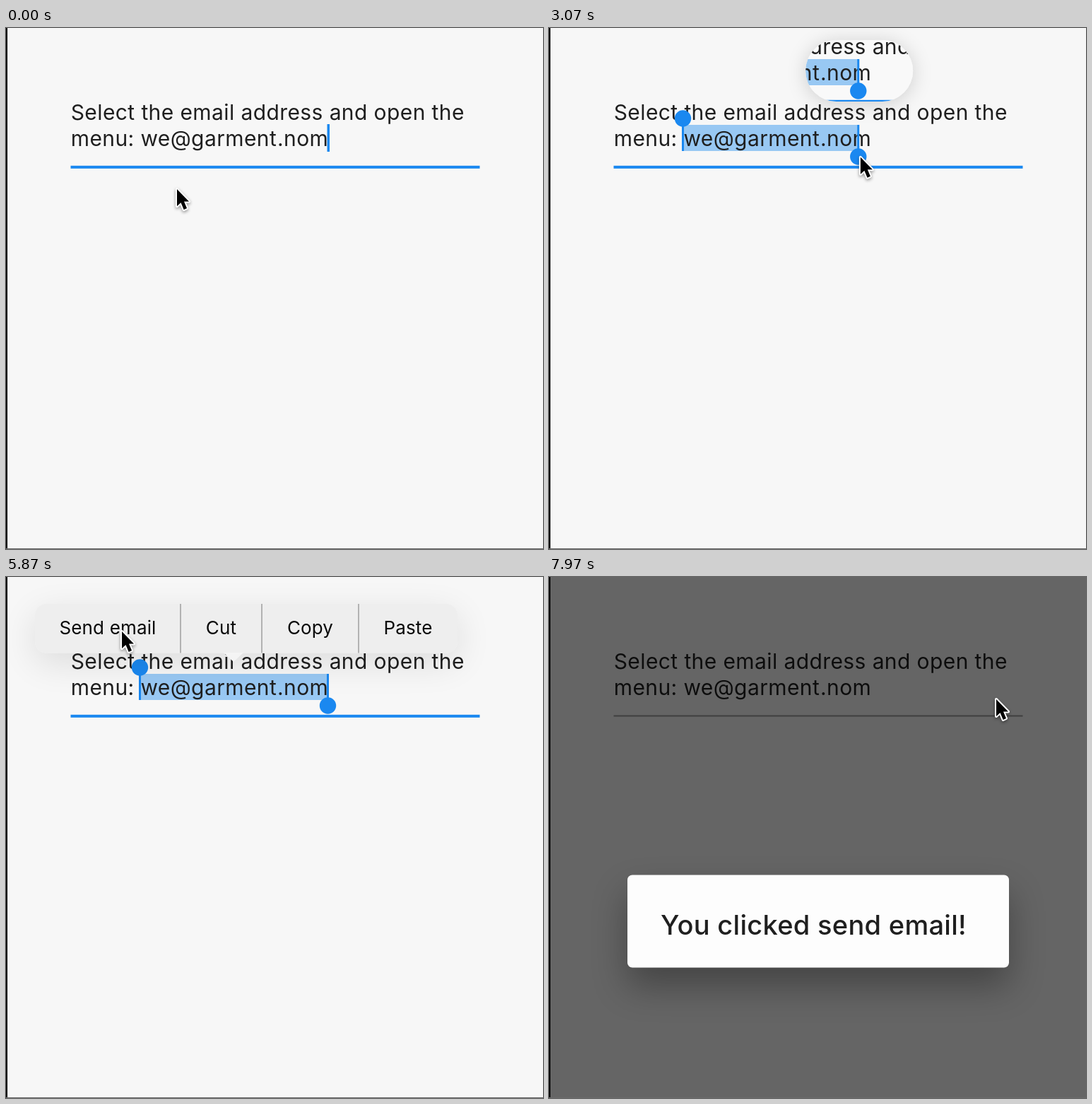
An HTML page with a canvas for the animation above (8 s loop, 760x737 px).

```html
<!DOCTYPE html>
<html lang="en">
<head>
<meta charset="utf-8">
<title>Send email menu</title>
<style>
  html, body { margin: 0; width: 100%; height: 100%; overflow: hidden; background: #f7f7f7; }
  canvas { display: block; }
</style>
</head>
<body>
<canvas id="stage" width="760" height="737"></canvas>
<script>
const ctx = document.getElementById('stage').getContext('2d');
const W = 760, H = 737, LOOP = 8000;
const BLUE = '#1a88f0', INK = '#1f1f1f';
const SEL_LEFT = 189.5, SEL_RIGHT = 384, CHAR = 17.75;
const SELECT = 1150, DRAG = 2550, RELEASE = 3950, CLICK = 5960, DIALOG = 6222;

// Pointer moves: start, end, and where the tip comes to rest
const START = [240, 226];
const MOVES = [
  [30, 750, 300, 158],
  [1450, 2150, 386, 180],
  [DRAG, 3300, 454, 181],
  [RELEASE, 4400, 444, 204],
  [4400, 5020, 200, 88],
  [5020, 5450, 162, 75],
  [6970, 7470, 640, 117],
  [7700, 7970, 631, 171]
];

const ramp = (t, from, ms = 150) => Math.max(0, Math.min(1, (t - from) / ms));
const smooth = u => u * u * (3 - 2 * u);
const fade = (t, from, to) => ramp(t, from) - ramp(t, to);

function pointerAt(t) {
  return MOVES.reduce(([x, y], [from, to, nx, ny]) => {
    const u = smooth(ramp(t, from, to - from));
    return [x + (nx - x) * u, y + (ny - y) * u];
  }, START);
}

const dragX = t => SEL_RIGHT + 4 * CHAR * smooth(ramp(t, DRAG, 750));
const selectionEnd = t => SEL_RIGHT + CHAR * Math.round((dragX(t) - SEL_RIGHT) / CHAR);

function rect(color, x, y, w, h) {
  ctx.fillStyle = color;
  ctx.fillRect(x, y, w, h);
}

function text(str, x, y, size, color, spacing, weight = 400) {
  ctx.font = `${weight} ${size}px Inter, sans-serif`;
  ctx.letterSpacing = spacing + 'px';
  ctx.fillStyle = color;
  ctx.fillText(str, x, y);
}

// Rounded panel whose shadow is kept outside its own shape
function panel(x, y, w, h, r, color, shade, blur, dy) {
  const shape = new Path2D(), outside = new Path2D();
  shape.roundRect(x, y, w, h, r);
  outside.rect(0, 0, W, H);
  outside.addPath(shape);
  ctx.save();
  ctx.clip(outside, 'evenodd');
  ctx.globalAlpha *= shade;
  ctx.shadowColor = ctx.fillStyle = '#000';
  ctx.shadowBlur = blur;
  ctx.shadowOffsetX = 2 * W;
  ctx.shadowOffsetY = dy;
  ctx.translate(-2 * W, 0);
  ctx.fill(shape);
  ctx.restore();
  ctx.fillStyle = color;
  ctx.fill(shape);
  return shape;
}

function handle(x, y) {
  rect(BLUE, x - 1.5, 137, 3, 37);
  ctx.beginPath();
  ctx.arc(x, y, 11.7, 0, 7);
  ctx.fill();
}

function field(t) {
  const selected = t >= SELECT && t < CLICK, end = selectionEnd(t);
  if (selected) rect('#98c8f3', SEL_LEFT, 137, end - SEL_LEFT, 37);
  text('Select the email address and open the', 91.7, 129.8, 30, INK, .4);
  text('menu: we@garment', 91.7, 166.8, 30, INK, .4);
  text('.nom', 384, 166.8, 30, INK, .4);
  if (t < 6300) rect(BLUE, 91.5, 194.8, 579, 4);
  else rect('rgba(0,0,0,.38)', 91.5, 195.5, 579, 2);
  if (selected) {
    handle(SEL_LEFT, 128);
    handle(end + .5, 182);
  } else if (t < SELECT && t % 900 < 400) {
    rect(BLUE, 454.5, 136, 3.5, 39);
  }
}

function magnifier(t) {
  const a = fade(t, 2300, RELEASE);
  if (!a) return;
  ctx.save();
  ctx.globalAlpha = a;
  ctx.clip(panel(dragX(t) - 76, 17 + 54 * (1 - a), 152, 87, 43.5, '#f9f9f9', .17, 28, 3));
  ctx.translate(0, -93);
  field(t);
  ctx.restore();
}

function toolbar(alpha, x, arrow, items) {
  if (!alpha) return;
  const width = items.reduce((sum, item) => sum + item[1], 0);
  ctx.save();
  ctx.globalAlpha = alpha;
  panel(x, 38, width, 69.5, 16, '#eeeeee', .11, 50, 14);
  ctx.beginPath();
  ctx.moveTo(arrow - 14, 107);
  ctx.lineTo(arrow, 120);
  ctx.lineTo(arrow + 14, 107);
  ctx.fillStyle = '#f4f4f4';
  ctx.fill();
  ctx.textAlign = 'center';
  items.forEach(([label, w], i) => {
    if (i) rect('#b2b2b2', x - 1, 38, 2, 69.5);
    text(label, x + w / 2, 81, 26, '#0a0a0a', .15);
    x += w;
  });
  ctx.restore();
}

function dialog(t) {
  const u = ramp(t, DIALOG, 130);
  if (!u) return;
  rect(`rgba(0,0,0,${.587 * smooth(u)})`, 0, 0, W, H);
  ctx.save();
  ctx.globalAlpha = u;
  panel(111, 421.5, 540, 131, 7, '#fdfdfd', .32, 50, 26);
  text('You clicked send email!', 158, 505.5, 38, INK, .3, 500);
  ctx.restore();
}

function pointer(x, y) {
  ctx.save();
  ctx.translate(x + 2, y + 2);
  ctx.beginPath();
  [[0, 0], [0, 24], [5.5, 19], [9.7, 29], [14, 27], [10, 17.5], [17, 17.5]]
    .forEach(p => ctx.lineTo(...p));
  ctx.closePath();
  ctx.lineWidth = 4;
  ctx.lineJoin = 'round';
  ctx.strokeStyle = '#fff';
  ctx.shadowColor = 'rgba(0,0,0,.4)';
  ctx.shadowBlur = 4;
  ctx.shadowOffsetY = 2;
  ctx.stroke();
  ctx.shadowColor = 'transparent';
  ctx.fillStyle = '#000';
  ctx.fill();
  ctx.restore();
}

function draw(t) {
  const edit = [['Cut', 115], ['Copy', 137], ['Paste', 140]];
  rect('#f7f7f7', 0, 0, W, H);
  field(t);
  magnifier(t);
  toolbar(fade(t, 1250, 2180), 91, 287, edit);
  toolbar(fade(t, RELEASE + 100, CLICK), 41, 322, [['Send email', 206], ...edit]);
  dialog(t);
  rect('#000', 0, 0, 2, H);
  rect('#6a6a6a', 0, H - 1, W, 1);
  pointer(...pointerAt(t));
}

function frame() {
  draw(performance.now() % LOOP);
  requestAnimationFrame(frame);
}
frame();
</script>
</body>
</html>
```
